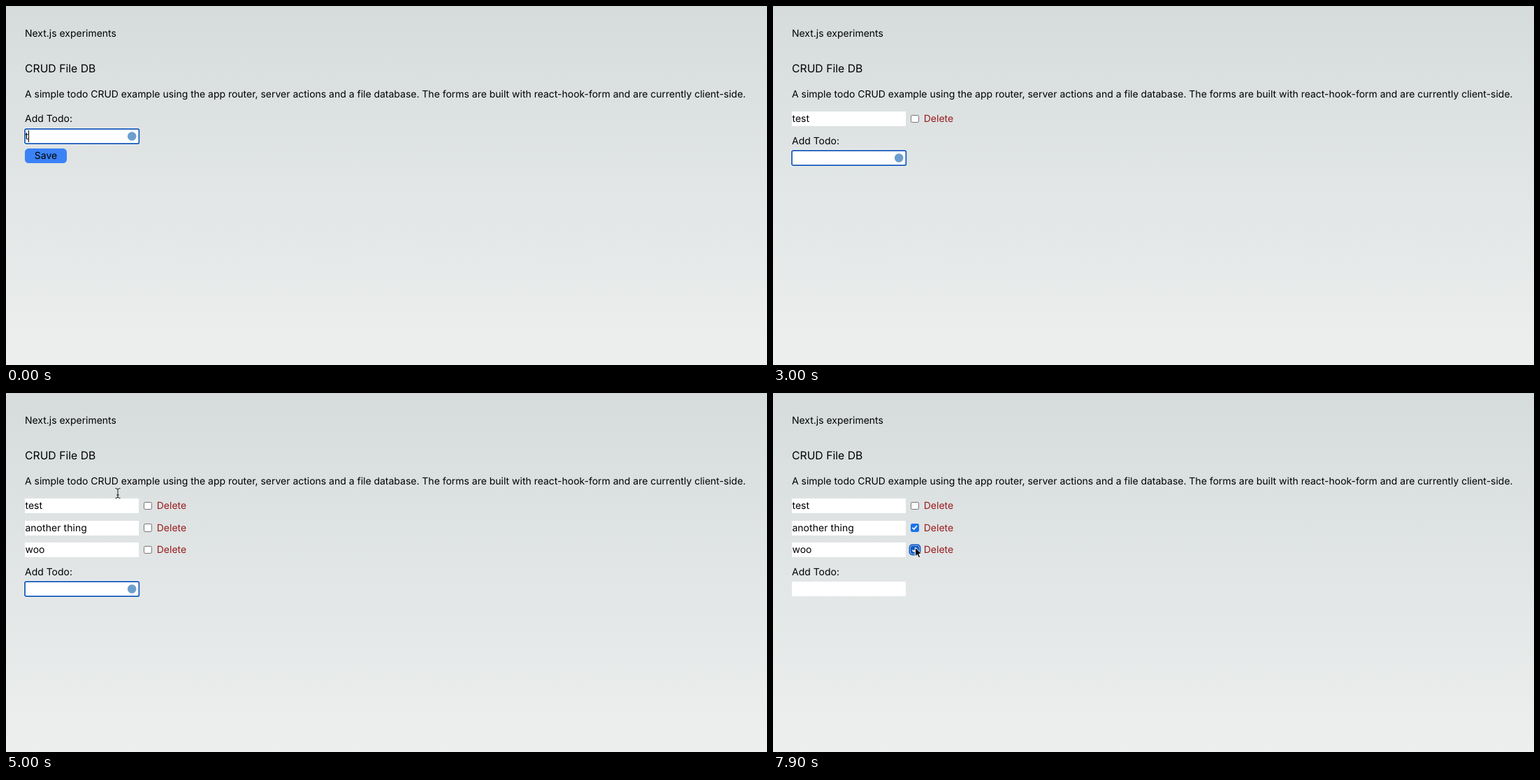
An HTML page that plays this animation: 1089x514 px, repeating every 8 s.

```html
<!DOCTYPE html>
<html lang="en">
<head>
<meta charset="utf-8">
<title>Todo demo</title>
<style>
  html, body { margin: 0; width: 100%; height: 100%; overflow: hidden; }
  body {
    position: relative;
    background: linear-gradient(#d6dbdc, #e2e6e6 52%, #edefee);
    color: #000;
    font: 13.98px/21px Inter, sans-serif;
    text-rendering: geometricPrecision;
    white-space: pre;
  }
  body::before { content: ""; position: absolute; inset: 0 0 auto; height: 1px; background: #cdd2d3; }
  .line, main { position: absolute; left: 27px; }
  .title { top: 29px; }
  .heading { top: 77.5px; font-size: 15.75px; line-height: 24.5px; }
  .about { top: 116px; }
  main { top: 151px; }
  .row { display: flex; align-items: center; gap: 7px; height: 21px; margin-bottom: 10.5px; }
  .field {
    position: relative; box-sizing: border-box; width: 163.4px; height: 21px;
    padding-left: .4px; background: #fff; letter-spacing: .06px;
  }
  .check {
    box-sizing: border-box; width: 11.4px; height: 11.4px;
    border: 1px solid #767676; border-radius: 2.2px; background: #fff;
  }
  .check svg { display: none; position: absolute; width: 11.4px; height: 11.4px; margin: -1px; }
  .check.on { background: #1a73e8; border-color: #1a73e8; }
  .check.on svg { display: block; }
  .check.hover { border-color: #4f4f4f; }
  .check.on.hover { background: #1059c4; border-color: #1059c4; }
  .check.ring { box-shadow: 0 0 0 .8px #a9c8f5, 0 0 0 2.4px #0b57c0; }
  .update { color: #1e40af; }
  .delete { color: #991b1b; }
  #entry { margin-top: 3.5px; }
  #focus { position: absolute; left: 0; top: 0; overflow: visible; }
  #focus rect { width: 163.4px; height: 21px; rx: 1.8px; fill: none; }
  #caret { display: inline-block; width: 1px; height: 17px; margin-right: -1px; vertical-align: -4px; background: #000; }
  #save { width: 60px; height: 21px; margin-top: 7px; border-radius: 5.25px; background: #3b82f6; text-align: center; }
  #pointer { position: absolute; left: 0; top: 0; overflow: visible; }
  [hidden] { display: none !important; }
</style>
</head>
<body>
<div class="line title">Next.js experiments</div>
<div class="line heading">CRUD File DB</div>
<div class="line about">A simple todo CRUD example using the app router, server actions and a file database. The forms are built with react-hook-form and are currently client-side.</div>
<main><div id="list"></div><div>Add Todo:</div><div id="entry" class="field"><svg id="focus" width="164" height="21"><rect stroke="#fff" stroke-opacity=".6" stroke-width="3.5"/><rect stroke="#1257b8" stroke-width="1.75" style="fill:#fff"/><circle cx="153.2" cy="10.5" r="6.3" fill="#6c9fce"/></svg><span id="typed" style="position:relative"></span><span id="caret" style="position:relative"></span></div><div id="save">Save</div></main>
<svg id="pointer" width="1" height="1">
  <defs><path id="stem" d="M-3.5 -7 Q0 -7 0 -5 Q0 -7 3.5 -7 M0 -5 V5 M-3.5 7 Q0 7 0 5 Q0 7 3.5 7 M-1.8 2.5 H1.8"/></defs>
  <g id="beam" fill="none">
    <use href="#stem" stroke="#fff" stroke-opacity=".5" stroke-width="2"/>
    <use href="#stem" stroke="#111"/>
  </g>
  <path id="arrow" d="M0 0 V13 L3 10.3 L5 14.8 L7.2 13.8 L5.3 9.5 H9.3 Z" stroke="#fff"/>
  <g id="hand" stroke="#000" stroke-linejoin="round">
    <path d="M-.6 14.5 Q-.8 12 -3 9.6 L-5 7.2 Q-5.2 5.2 -3.2 6 L-1.6 7.4 L-2.8 1.6 Q-2.2 -.6 -.6 1 L.5 4.8 Q1.6 3.6 2.7 5 Q3.9 4 4.8 5.5 Q6.3 5 6.8 6.8 Q7.2 9.4 5.8 11.6 V14.5 Z" fill="#fff"/>
    <path d="M1 9 V12 M2.8 9 V12 M4.5 9 V12" fill="none" stroke-width=".8"/>
  </g>
</svg>
<script>
const LOOP = 8000, STEP = 100;
const $ = id => document.getElementById(id);
const within = (t, from, to) => t >= from && t < to;

const todos = [
  { text: "test", added: 900 },
  { text: "another thing", added: 3100, checked: 5700, saved: 6400, hover: [5400, 6000] },
  { text: "woo", added: 4300, checked: 7600, saved: 7900, hover: [7400, LOOP], ring: 7800 }
];

for (const todo of todos) {
  const row = document.createElement("div");
  row.className = "row";
  row.innerHTML = `<div class="field">${todo.text}</div><div class="check"><svg viewBox="0 0 13 13"><path d="M2.8 6.8 L5.3 9.3 L10.2 3.6" fill="none" stroke="#fff" stroke-width="1.9"/></svg></div><span class="update">Update</span><span class="delete">Delete</span>`;
  $("list").append(row);
  Object.assign(todo, { row, check: row.querySelector(".check"), update: row.querySelector(".update") });
}

// Each point is time, x, y; the pointer rests where neighbours agree.
const path = [
  [4600, 95, 280], [4800, 126, 190], [5000, 160, 143.5], [5100, 172, 141.5],
  [5400, 204, 193], [5500, 205, 192], [5900, 205, 192], [6100, 247, 196],
  [6700, 247, 196], [6800, 238.5, 195.5], [7200, 216, 212], [7500, 203.5, 221], [LOOP, 203.5, 221]
];

function pointerAt(t) {
  const i = path.findIndex(p => p[0] > t);
  const [t0, x0, y0] = path[i - 1], [t1, x1, y1] = path[i];
  const k = (t - t0) / (t1 - t0);
  return [x0 + (x1 - x0) * k, y0 + (y1 - y0) * k];
}

function typedAt(t) {
  if (t < 800) return "test".slice(0, t < 100 ? 1 : t < 200 ? 2 : 4);
  if (within(t, 1600, 3000)) {
    const count = t < 1700 ? 1 : t < 1900 ? 2 : Math.round(3 + (t - 1900) * 9 / 800);
    return "another thing".slice(0, t < 2800 ? Math.min(count, 12) : 13);
  }
  if (within(t, 3600, 4200)) return "woo".slice(0, t < 3700 ? 1 : t < 4000 ? 2 : 3);
  return "";
}

function render(t) {
  const typed = typedAt(t);
  $("typed").textContent = typed;
  $("caret").hidden = $("save").hidden = !typed;
  $("focus").style.display = t < 5700 ? "" : "none";

  for (const { row, check, update, added, checked, saved, hover, ring } of todos) {
    row.hidden = t < added;
    update.hidden = !within(t, checked, saved);
    check.classList.toggle("on", t >= checked);
    check.classList.toggle("hover", !!hover && within(t, ...hover));
    check.classList.toggle("ring", t >= ring);
  }

  const shape = t < 4600 ? "" : t < 5200 ? "beam" : within(t, 6000, 7000) ? "hand" : "arrow";
  for (const id of ["beam", "arrow", "hand"]) $(id).style.display = id === shape ? "" : "none";
  if (shape) {
    const [x, y] = pointerAt(t);
    $("pointer").style.transform = `translate(${x}px, ${y}px)`;
  }
}

const start = performance.now();
function tick() {
  const t = (performance.now() - start) % LOOP;
  render(Math.floor(t / STEP) * STEP);
  requestAnimationFrame(tick);
}
tick();
</script>
</body>
</html>
```
